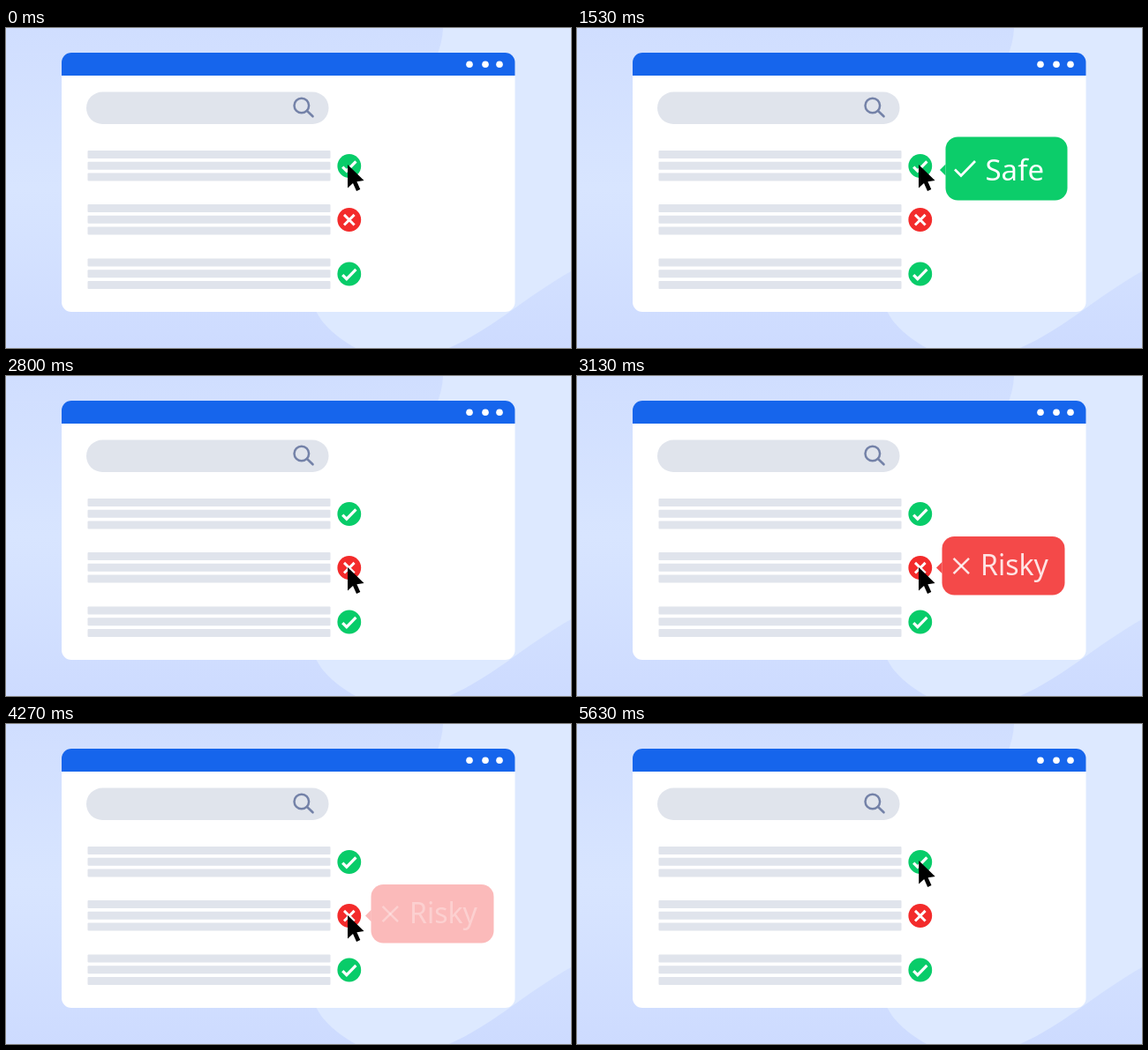
Recreate the animation shown at these times as an HTML page with a canvas. Size 640 by 363 pixels, loop 5660 ms.

```html
<!DOCTYPE html>
<html lang="en">
<head>
<meta charset="utf-8">
<title>Search result ratings</title>
<style>
html, body { margin: 0; width: 100%; height: 100%; overflow: hidden; background: #d4e1ff; }
canvas { display: block; width: 640px; height: 363px; }
</style>
</head>
<body>
<canvas id="stage"></canvas>
<script>
const LOOP = 5660, W = 640, H = 363;
const GREEN = '#08cc69', RED = '#f32b2b';
const canvas = document.getElementById('stage');
const ctx = canvas.getContext('2d');
const dpr = window.devicePixelRatio || 1;
canvas.width = W * dpr;
canvas.height = H * dpr;
ctx.scale(dpr, dpr);

// Cursor tip: time, x, y
const path = [
  [0, 387, 155], [1740, 387, 155], [2150, 387, 217],
  [4370, 387, 217], [4850, 490, 201], [4920, 490, 201], [5560, 388, 154.5], [LOOP, 387, 155]
];

const clamp = v => Math.max(0, Math.min(1, v));
const ease = v => v * v * (3 - 2 * v);
const ramp = (t, a, b) => ease(clamp((t - a) / (b - a)));
const pulse = (t, a, b, c, d) => ramp(t, a, b) * (1 - ramp(t, c, d));

function roundRect(x, y, w, h, r, fill) {
  ctx.fillStyle = fill;
  ctx.beginPath();
  ctx.roundRect(x, y, w, h, r);
  ctx.fill();
}

function dot(x, y, r, fill) {
  ctx.fillStyle = fill;
  ctx.beginPath();
  ctx.arc(x, y, r, 0, Math.PI * 2);
  ctx.fill();
}

function polygon(points, fill) {
  ctx.fillStyle = fill;
  ctx.beginPath();
  points.forEach(([x, y]) => ctx.lineTo(x, y));
  ctx.closePath();
  ctx.fill();
}

function line(points, color, width) {
  ctx.strokeStyle = color;
  ctx.lineWidth = width;
  ctx.beginPath();
  points.forEach(([x, y], i) => i ? ctx.lineTo(x, y) : ctx.moveTo(x, y));
  ctx.stroke();
}

function check(x, y, s, width) {
  line([[x - 11.5 * s, y + s], [x - 4.5 * s, y + 8 * s], [x + 11.5 * s, y - 8.5 * s]], '#fff', width);
}

function cross(x, y, r, width) {
  line([[x - r, y - r], [x + r, y + r]], '#fff', width);
  line([[x - r, y + r], [x + r, y - r]], '#fff', width);
}

function backdrop() {
  const g = ctx.createLinearGradient(0, 0, 0, H);
  g.addColorStop(0, '#d0deff');
  g.addColorStop(0.5, '#d8e5ff');
  g.addColorStop(1, '#cddbff');
  ctx.fillStyle = g;
  ctx.fillRect(0, 0, W, H);

  ctx.fillStyle = '#dde9ff';
  ctx.beginPath();
  ctx.moveTo(495, 0);
  ctx.bezierCurveTo(492, 90, 330, 190, 346, 305);
  ctx.bezierCurveTo(350, 330, 370, 348, 396, 363);
  ctx.lineTo(502, 363);
  ctx.bezierCurveTo(550, 342, 590, 304, 640, 276);
  ctx.lineTo(640, 0);
  ctx.fill();
}

function browser() {
  roundRect(63, 28, 513.5, 294, 11, '#fff');
  roundRect(63, 28, 513.5, 26, [11, 11, 0, 0], '#1665ec');
  [525, 543, 559].forEach(x => dot(x, 41.3, 3.8, '#fff'));

  roundRect(91, 72.5, 274.5, 36.5, 18.25, '#e0e4ec');
  ctx.lineCap = 'round';
  ctx.strokeStyle = '#7482a8';
  ctx.lineWidth = 2.5;
  ctx.beginPath();
  ctx.arc(334.8, 88, 8.3, 0, Math.PI * 2);
  ctx.stroke();
  line([[341, 94], [347.5, 100.3]], '#7482a8', 2.6);
  ctx.lineCap = 'butt';

  [156.3, 217.3, 278.8].forEach((y, i) => {
    for (let k = -1; k < 2; k++) roundRect(92.5, y - 4.5 + k * 12.8, 275, 9, 1, '#e0e4ec');
    dot(388.8, y + 0.2, 13.4, i === 1 ? RED : GREEN);
    if (i === 1) cross(388.8, y + 0.4, 5.8, 2.9);
    else check(388.8, y + 0.6, 0.66, 3.2);
  });
}

function bubble(alpha, box, tipY, color, label, textX, baseline, size, mark) {
  if (alpha <= 0) return;
  const [x, y, w, h] = box;
  ctx.globalAlpha = alpha;
  roundRect(x, y, w, h, 14, color);
  polygon([[x - 6.5, tipY], [x, tipY - 6.5], [x, tipY + 6.5]], color);
  mark();
  ctx.font = `500 ${size}px "Noto Sans", "Open Sans", sans-serif`;
  ctx.fillStyle = '#fff';
  ctx.fillText(label, textX, baseline);
  ctx.globalAlpha = 1;
}

function cursor(t) {
  let i = 0;
  while (i < path.length - 2 && t >= path[i + 1][0]) i++;
  const [a, ax, ay] = path[i], [b, bx, by] = path[i + 1];
  const p = ramp(t, a, b);
  ctx.save();
  ctx.translate(ax + (bx - ax) * p, ay + (by - ay) * p);
  polygon([[0, 0], [0, 26.5], [6, 21], [10, 30], [14.3, 28], [10.4, 19.3], [18.5, 18]], '#000');
  ctx.restore();
}

function draw(t) {
  backdrop();
  browser();
  bubble(pulse(t, 500, 850, 1570, 1830), [417.5, 123.5, 138, 72], 161, '#0ccd6a',
    'Safe', 462.5, 173, 33, () => check(439.5, 159.5, 1, 2.7));
  bubble(pulse(t, 2820, 3230, 4110, 4370), [413.5, 182, 139, 66.5], 217.5, '#f22b2b',
    'Risky', 457, 226, 32, () => cross(435.3, 215.5, 8.7, 2.5));
  cursor(t);
}

const start = performance.now();
function tick() {
  draw((performance.now() - start) % LOOP);
  requestAnimationFrame(tick);
}
tick();
</script>
</body>
</html>
```
